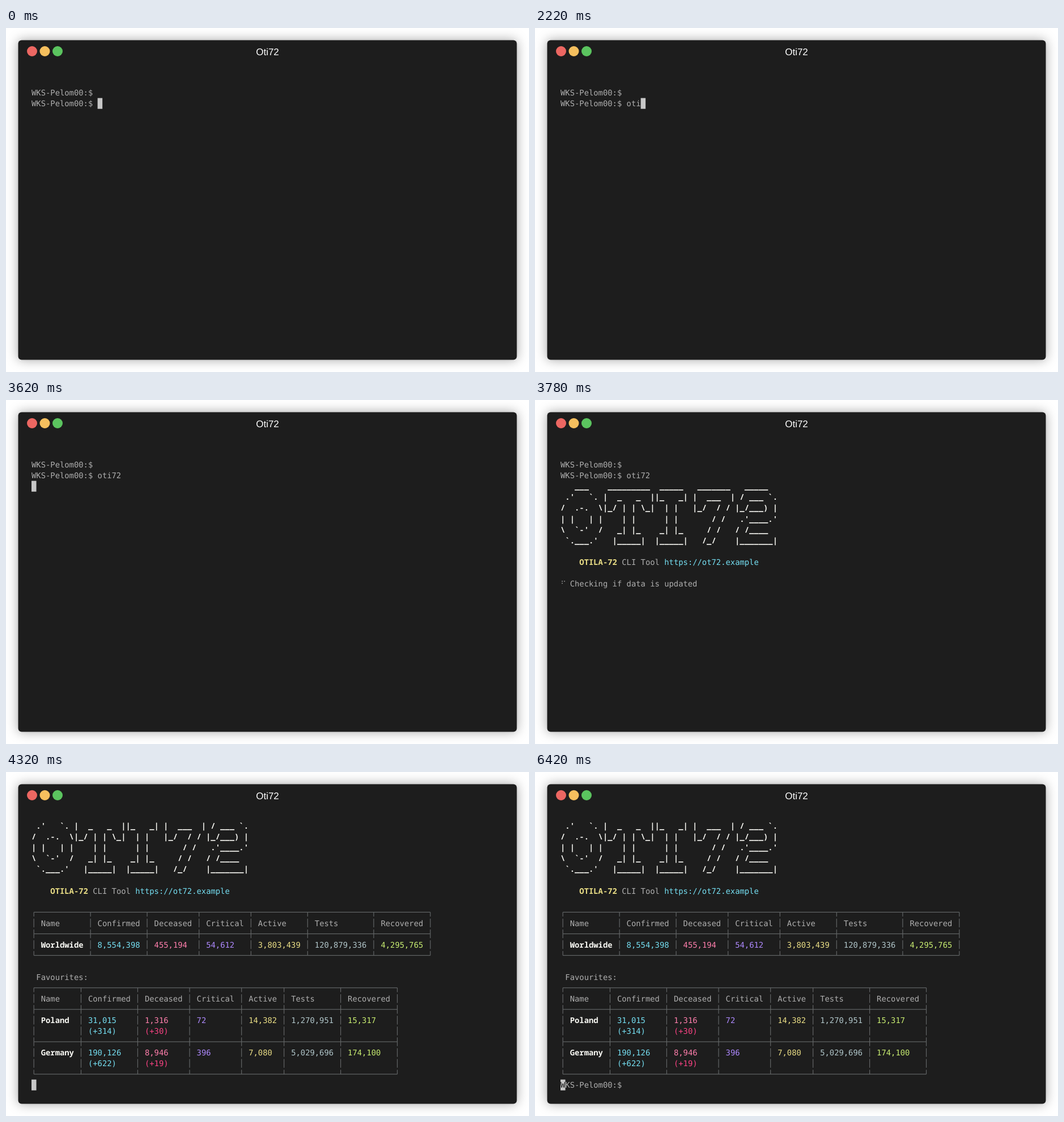
Recreate the animation shown at these times as an HTML page with a canvas. Size 923 px wide and 607 px high, loop 7240 ms.

```html
<!DOCTYPE html>
<html lang="en">
<head>
<meta charset="utf-8">
<title>Terminal</title>
<style>
html, body { margin: 0; width: 100%; height: 100%; overflow: hidden; background: #fff; }
canvas { display: block; }
</style>
</head>
<body>
<canvas id="stage" width="923" height="607"></canvas>
<pre id="banner" hidden>
   ___    _________  _____   _______   _____
 .'   `. |  _   _  ||_   _| |  ___  | / ___ `.
/  .-.  \|_/ | | \_|  | |   |_/  / / |_/___) |
| |   | |    | |      | |       / /   .'____.'
\  `-'  /   _| |_    _| |_     / /   / /____
 `.___.'   |_____|  |_____|   /_/    |_______|</pre>
<script>
const ctx = document.getElementById('stage').getContext('2d');
const banner = document.getElementById('banner').textContent.replace(/^\n/, '').split('\n');

const LOOP = 7240, LEFT = 45, TOP = 95, CELL = 8.33, LINE = 19.05;
const REGULAR = '13.84px "DejaVu Sans Mono", monospace';
const BOLD = 'bold 13.88px "Noto Sans Mono", monospace';
const BACK = '#1d1d1d', GREY = '#afafaf', BORDER = '#626566', WHITE = '#f9f9f4',
  BLUE = '#75dff2', PINK = '#ff7fac', RED = '#fc4384', PURPLE = '#ae89fe',
  YELLOW = '#ebdf86', PALE = '#b1c6ca', GREEN = '#c8ed71';
const COLORS = [WHITE, BLUE, PINK, PURPLE, YELLOW, PALE, GREEN];
const HEADER = ['Name', 'Confirmed', 'Deceased', 'Critical', 'Active', 'Tests', 'Recovered'];
const PROMPT = 'WKS-Pelom00:$ ', COMMAND = 'oti72';
const KEY_TIMES = [1970, 2090, 2220, 2720, 2830];
const ENTER = 3620, LOADING = 3780, CLEARED = 4300, RESULT = 4320, DONE = 4420, REWIND = 6420;

let scroll = 0;
const xAt = col => LEFT + col * CELL;
const yAt = row => TOP + (row - scroll) * LINE;

function write(row, col, text, color = GREY, font = REGULAR) {
  if (row < scroll) return;
  ctx.font = font;
  ctx.fillStyle = color;
  ctx.fillText(text, xAt(col), yAt(row) + 5.2);
}

function cursor(row, col) {
  ctx.fillStyle = '#c7c7c7';
  ctx.fillRect(xAt(col), yAt(row) - 9.5, CELL + 0.2, LINE);
}

// Each body row lists its cells; a cell may hold a second line after "\n".
function table(top, body) {
  const widths = HEADER.map((h, i) =>
    Math.max(h.length, ...body.flatMap(r => r[i].split('\n').map(s => s.length))));
  const bars = [0];
  widths.forEach((w, i) => bars.push(bars[i] + w + 3));

  const bar = (row, from = -7.7, to = 7.7) => {
    ctx.fillStyle = BORDER;
    for (const b of bars) ctx.fillRect(xAt(b + 0.5) - 0.6, yAt(row) + from, 1.2, to - from);
  };
  const rule = (row, from, to) => {
    bar(row, from, to);
    ctx.fillRect(xAt(0.5), yAt(row) - 0.6, xAt(bars.at(-1)) - xAt(0), 1.2);
  };

  rule(top, 0);
  bar(top + 1);
  HEADER.forEach((h, i) => write(top + 1, bars[i] + 2, h));
  let row = top + 2;
  for (const cells of body) {
    rule(row++);
    const height = Math.max(...cells.map(c => c.split('\n').length));
    for (let k = 0; k < height; k++, row++) {
      bar(row);
      cells.forEach((cell, i) => {
        const text = cell.split('\n')[k];
        const color = k && i === 2 ? RED : COLORS[i];
        if (text) write(row, bars[i] + 2, text, color, i ? REGULAR : BOLD);
      });
    }
  }
  rule(row, undefined, 0);
}

function spinner(row, step) {
  const dots = '⠋⠙⠹⠸⠼⠴'.charCodeAt(Math.min(step, 5));
  ctx.fillStyle = GREY;
  for (let i = 0; i < 6; i++) {
    if (dots >> i & 1) {
      ctx.fillRect(xAt(0) + (i < 3 ? 2.3 : 6.3), yAt(row) - 4.6 + i % 3 * 3.7, 1.5, 1.5);
    }
  }
}

function drawWindow() {
  ctx.fillStyle = '#fff';
  ctx.fillRect(0, 0, 923, 607);
  ctx.save();
  ctx.shadowColor = 'rgba(0,0,0,.36)';
  ctx.shadowBlur = 20;
  ctx.fillStyle = BACK;
  ctx.beginPath();
  ctx.roundRect(21.5, 21.5, 880, 564, 6);
  ctx.fill();
  ctx.restore();
  ['#ec6762', '#f5bf5e', '#5bc45f'].forEach((color, i) => {
    ctx.fillStyle = color;
    ctx.beginPath();
    ctx.arc(46 + i * 22.5, 41, 9, 0, 7);
    ctx.fill();
  });
  ctx.fillStyle = '#fff';
  ctx.font = '17px "Liberation Sans", Arial, sans-serif';
  ctx.textAlign = 'center';
  ctx.fillText('Oti72', 461.5, 48);
  ctx.textAlign = 'left';
}

function drawOutput(t) {
  banner.forEach((line, i) => write(3 + i, 0, line, WHITE, BOLD));
  write(10, 4, 'OTILA-72', YELLOW, BOLD);
  write(10, 13, 'CLI Tool');
  write(10, 22, 'https://ot72.example', BLUE);
  if (t < CLEARED) {
    spinner(12, Math.floor((t - LOADING) / 84));
    write(12, 2, 'Checking if data is updated');
  } else if (t < RESULT) {
    cursor(12, 0);
  } else {
    table(12, [['Worldwide', '8,554,398', '455,194', '54,612', '3,803,439', '120,879,336', '4,295,765']]);
    write(18, 1, 'Favourites:');
    table(19, [
      ['Poland', '31,015\n(+314)', '1,316\n(+30)', '72', '14,382', '1,270,951', '15,317'],
      ['Germany', '190,126\n(+622)', '8,946\n(+19)', '396', '7,080', '5,029,696', '174,100']
    ]);
    if (t >= DONE) write(28, 0, PROMPT);
    cursor(28, t >= DONE && t < REWIND ? PROMPT.length : 0);
    if (t >= REWIND) write(28, 0, PROMPT[0], BACK);
  }
}

function draw(now) {
  const t = now % LOOP;
  const typed = KEY_TIMES.filter(k => t >= k).length;
  scroll = t >= RESULT ? 4 : 0;
  ctx.textRendering = 'geometricPrecision';
  drawWindow();
  write(1, 0, PROMPT);
  write(2, 0, PROMPT + COMMAND.slice(0, typed));
  if (t < ENTER) cursor(2, PROMPT.length + typed);
  else if (t < LOADING) cursor(3, 0);
  else drawOutput(t);
}

const start = performance.now();
function tick() {
  draw(performance.now() - start);
  requestAnimationFrame(tick);
}
tick();
</script>
</body>
</html>
```
